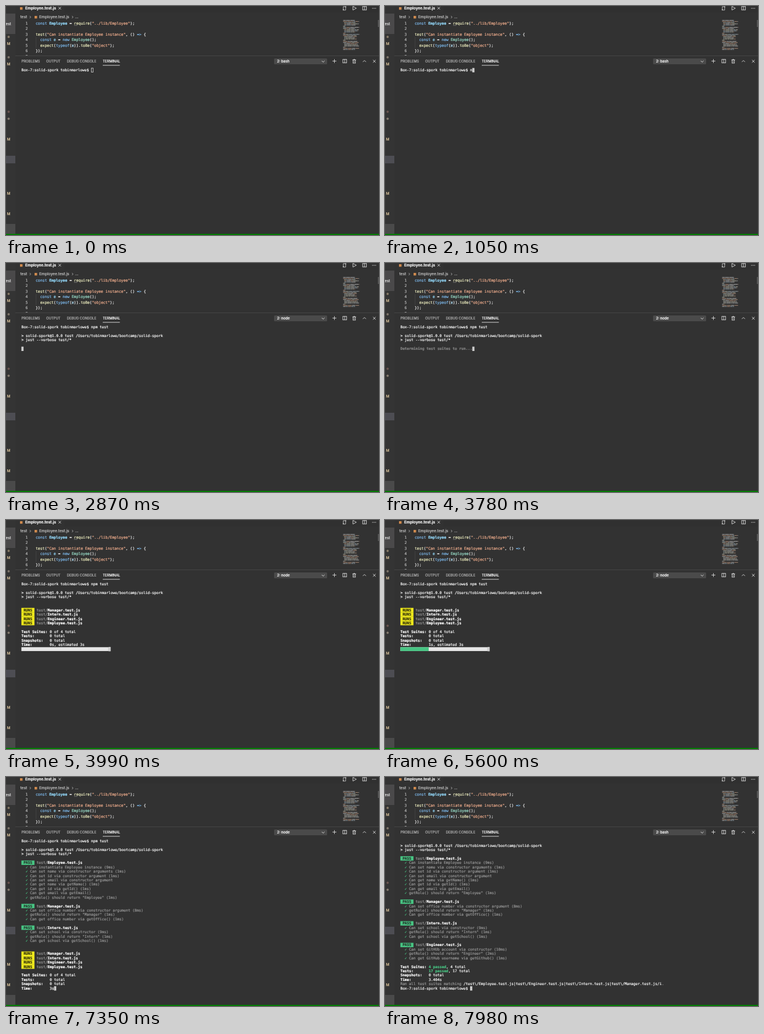
These frames come from a looping animation (640 by 393 pixels, 8000 ms). An HTML page with a canvas:

```html
<!DOCTYPE html>
<html lang="en">
<head>
<meta charset="utf-8">
<title>Test run in the terminal</title>
<style>
html, body { margin: 0; width: 100%; height: 100%; overflow: hidden; background: #323232; }
canvas { display: block; width: 640px; height: 393px; }
</style>
</head>
<body>
<canvas id="stage"></canvas>
<script>
const W = 640, H = 393, LOOP = 8000;
const MONO = '"DejaVu Sans Mono", monospace';
const SANS = 'Inter, sans-serif';
const BG = '#323232', ICON = '#dadada', SCRIPT = '#cf8a4e';
const canvas = document.getElementById('stage');
const ctx = canvas.getContext('2d');
const ratio = window.devicePixelRatio || 1;
canvas.width = W * ratio;
canvas.height = H * ratio;
ctx.scale(ratio, ratio);

// ---- drawing helpers ----
function rect(x, y, w, h, color) {
  ctx.fillStyle = color;
  ctx.fillRect(x, y, w, h);
}
// a thin outline gives small type a fuller weight
function text(str, x, y, font, color, align = 'left') {
  ctx.font = font;
  ctx.fillStyle = ctx.strokeStyle = color;
  ctx.lineWidth = 0.22;
  ctx.textAlign = align;
  ctx.fillText(str, x, y);
  ctx.strokeText(str, x, y);
}
function line(points, color = ICON, width = 0.9) {
  ctx.strokeStyle = color;
  ctx.lineWidth = width;
  ctx.beginPath();
  points.forEach(([x, y], i) => i ? ctx.lineTo(x, y) : ctx.moveTo(x, y));
  ctx.stroke();
}
function box(x, y, w, h, color = ICON, width = 0.9) {
  ctx.strokeStyle = color;
  ctx.lineWidth = width;
  ctx.strokeRect(x, y, w, h);
}
function dot(x, y, r, color) {
  ctx.fillStyle = color;
  ctx.beginPath();
  ctx.arc(x, y, r, 0, 7);
  ctx.fill();
}
function cross(x, y, r, color) {
  line([[x - r, y - r], [x + r, y + r]], color);
  line([[x - r, y + r], [x + r, y - r]], color);
}
function splitIcon(x, y) {
  box(x - 3, y - 3, 6.4, 6);
  line([[x + 0.2, y - 3], [x + 0.2, y + 3]]);
}
function random(seed) {
  return () => (seed = (seed * 16807) % 2147483647) / 2147483647;
}

// ---- sidebar ----
function drawSidebar() {
  rect(0, 0, 16, 391, '#343434');
  rect(0, 13, 16, 35, '#4a494a');
  rect(0, 257, 16, 13, '#4d4d53');
  rect(0, 374, 16, 17, '#4a4a4a');
  text('est', -0.6, 33.2, `6.5px ${SANS}`, '#e4e4e4');
  for (const y of [65, 100, 228.5, 322, 357])
    text('M', 4.5, y + 2.3, `6.3px ${SANS}`, '#e0c8a0', 'center');
  dot(4.5, 53, 2, '#857866');
  dot(4.5, 88, 2, '#7d746a');
  dot(4.5, 181.5, 2, '#69544f');
  dot(4.5, 193.5, 2, '#82796d');
}

// ---- editor ----
const C = {
  key: '#7db9ec', name: '#94d9fb', fn: '#ebebbd', type: '#9adfcb',
  str: '#eeac8c', v: '#b4e2fb', w: '#eeeeee'
};
const CODE = [
  [['key', 'const '], ['name', 'Employee', 'bold'], ['w', ' = '], ['fn', 'require'], ['w', '('], ['str', '"../lib/Employee"'], ['w', ');']],
  [],
  [['fn', 'test'], ['w', '('], ['str', '"Can instantiate Employee instance"'], ['w', ', () '], ['key', '=>'], ['w', ' {']],
  [['key', '  const '], ['name', 'e'], ['w', ' = '], ['key', 'new '], ['type', 'Employee'], ['w', '();']],
  [['fn', '  expect'], ['w', '('], ['key', 'typeof'], ['w', '('], ['v', 'e'], ['w', ')).'], ['fn', 'toBe'], ['w', '('], ['str', '"object"'], ['w', ');']],
  [['w', '});']],
  []
];

function drawMinimap() {
  const rnd = random(41);
  const colors = ['#a6a698', '#a58572', '#8d9aa2', '#a8a8a8'];
  for (let i = 0; i < 26; i++) {
    const y = 24.2 + i * 2;
    const closing = i % 6 === 5;
    const indent = i % 6 < 2 || closing ? 0 : 1.8;
    const end = closing ? 4 : 20 + rnd() * 9;
    for (let x = indent; x < end;) {
      const w = 2 + rnd() * 6;
      rect(578.5 + x, y, Math.min(w, end - x), 1, colors[Math.floor(rnd() * 4)]);
      x += w + 0.5;
    }
  }
}

function drawEditor() {
  rect(100, 0, 540, 11.5, '#303030');
  rect(24, 2, 4.4, 4.4, SCRIPT);
  text('Employee.test.js', 33, 6.3, `600 6.6px ${SANS}`, '#ffffff');
  cross(92.3, 3.8, 2.1, '#e0e0e0');

  const crumb = `6.7px ${SANS}`, grey = '#c2c2c2';
  text('test', 24.5, 21.2, crumb, grey);
  line([[40.6, 17], [42.6, 19], [40.6, 21]], grey, 0.8);
  rect(49, 17, 4.4, 4.4, SCRIPT);
  text('Employee.test.js', 57, 21.2, crumb, grey);
  line([[113.2, 17], [115.2, 19], [113.2, 21]], grey, 0.8);
  text('...', 118.5, 21.2, crumb, grey);

  // toolbar: compare, run, split, more
  line([[582, 1], [578.8, 1], [578.8, 6]], ICON, 0.8);
  line([[579.6, 7], [582.8, 7], [582.8, 2.4]], ICON, 0.8);
  dot(578.8, 6.4, 1, ICON);
  dot(582.8, 1.6, 1, ICON);
  line([[595.2, 0.6], [601.2, 3.8], [595.2, 7], [595.2, 0.6]]);
  splitIcon(615, 3.8);
  for (let i = 0; i < 3; i++) dot(629 + i * 2.6, 4, 0.7, ICON);

  ctx.save();
  ctx.beginPath();
  ctx.rect(16, 22, 624, 63);
  ctx.clip();
  const font = `6.41px ${MONO}`;
  CODE.forEach((parts, i) => {
    const y = 31.6 + i * 9.53;
    let x = 51;
    text(i + 1, 37.3, y, font, '#b4b4b4', 'right');
    for (const [style, str, weight = ''] of parts) {
      text(str, x, y, `${weight} ${font}`, C[style]);
      x += str.length * 3.859;
    }
  });
  rect(51, 53.5, 0.6, 18.8, '#4c4c4c');
  for (let i = 0; i < 3; i++) dot(117.6 + i * 1.9, 33.2, 0.5, '#c4c4c4');
  drawMinimap();
  rect(638, 24, 2, 12, '#555555');
  ctx.restore();
}

// ---- panel header ----
function drawPanelHeader(shell) {
  rect(16, 85, 624, 1, '#454545');
  const font = `5.9px ${SANS}`;
  [['PROBLEMS', 26.5], ['OUTPUT', 69], ['DEBUG CONSOLE', 104.5], ['TERMINAL', 166]].forEach(([label, x], i) =>
    text(label, x, 97.3, font, i === 3 ? '#ffffff' : '#b4b4b4'));
  rect(166, 101.4, 29.3, 0.9, '#e0e0e0');

  ctx.fillStyle = '#4a4a4a';
  ctx.beginPath();
  ctx.roundRect(460, 90, 91, 10, 1.5);
  ctx.fill();
  text('2: ' + shell, 465, 97.2, `500 6.1px ${SANS}`, '#ffffff');
  line([[541.8, 94], [544.2, 96.4], [546.6, 94]], '#e6e6e6');

  line([[560.2, 94.5], [566.8, 94.5]]);
  line([[563.5, 91.2], [563.5, 97.8]]);
  splitIcon(581, 94.6);
  line([[594.4, 92.4], [600.6, 92.4]]);
  box(595.4, 92.7, 4.2, 5.3);
  line([[596.6, 91.4], [598.4, 91.4]]);
  line([[597.5, 94], [597.5, 97]], ICON, 0.7);
  line([[612.3, 96.1], [615, 93.4], [617.7, 96.1]]);
  cross(632, 94.8, 2.3, '#e0e0e0');
}

// ---- terminal ----
const X0 = 26.4, TOP = 106.2, CW = 3.738, ROW = 7.432;
const GREEN = '#48c483', YELLOW = '#efe91c', WHITE = '#f8f8f8';
const STYLE = {
  w: [WHITE], b: ['#ffffff', 'bold'], d: ['#959595'], db: ['#858585', 'bold'],
  g: [GREEN, 'bold'], c: [GREEN],
  pass: ['#26352c', 'bold', GREEN], runs: ['#33320c', 'bold', YELLOW]
};

const PROMPT = 'Box-7:solid-spork tobinmarlowe$ ';
const COMMAND = 'npm test';
const HEADER = [
  [],
  [['w', '> solid-spork@1.0.0 test /Users/tobinmarlowe/bootcamp/solid-spork']],
  [['w', '> jest --verbose test/*']],
  []
];
const SUITES = {
  Employee: [
    'Can instantiate Employee instance (9ms)',
    'Can set name via constructor arguments (1ms)',
    'Can set id via constructor argument (1ms)',
    'Can set email via constructor argument',
    'Can get name via getName() (1ms)',
    'Can get id via getId() (1ms)',
    'Can get email via getEmail()',
    'getRole() should return "Employee" (1ms)'
  ],
  Manager: [
    'Can set office number via constructor argument (8ms)',
    'getRole() should return "Manager" (1ms)',
    'Can get office number via getOffice() (1ms)'
  ],
  Intern: [
    'Can set school via constructor (9ms)',
    'getRole() should return "Intern" (1ms)',
    'Can get school via getSchool() (1ms)'
  ],
  Engineer: [
    'Can set GitHUb account via constructor (10ms)',
    'getRole() should return "Engineer" (2ms)',
    'Can get GitHub username via getGithub() (1ms)'
  ]
};

// times in ms
const FOCUS = 420, ENTER = 2240, NODE = 2450, START = 2730, SEARCH = 3150,
  RUN = 3850, DONE = 7490, BASH = 7840;
const KEYS = [1050, 1120, 1190, 1260, 1330, 1470, 1470, 1540];
const TICKS = [4830, 5880, 6790];
const PASSES = [6930, 7070, 7210, DONE];

const countPast = (times, t) => times.filter(v => t >= v).length;
const badge = (kind, name) =>
  [[kind, ` ${kind.toUpperCase()} `], ['d', ' test/'], ['b', name + '.test.js']];
const suiteRows = name => [
  badge('pass', name),
  ...SUITES[name].map(item => [['c', '  ✓ '], ['d', item]]),
  []
];
const field = (label, ...rest) => [['b', label.padEnd(13)], ...rest];

function progressRows(secs) {
  const rows = [
    [],
    ...['Manager', 'Intern', 'Engineer', 'Employee'].map(n => badge('runs', n)),
    [],
    field('Test Suites:', ['w', '0 of 4 total']),
    field('Tests:', ['w', '0 total']),
    field('Snapshots:', ['w', '0 total']),
    field('Time:', ['w', secs + 's' + (secs < 3 ? ', estimated 3s' : '')])
  ];
  if (secs < 3) rows.push([['bar', Math.floor(secs / 3 * 40)]]);
  return rows;
}

function summaryRows() {
  const files = ['Employee', 'Engineer', 'Intern', 'Manager'].map(n => `test\\/${n}.test.js`);
  return [
    field('Test Suites:', ['g', '4 passed'], ['w', ', 4 total']),
    field('Tests:', ['g', '17 passed'], ['w', ', 17 total']),
    field('Snapshots:', ['w', '0 total']),
    field('Time:', ['w', '3.404s']),
    [['d', 'Ran all test suites matching '], ['w', `/${files.join('|')}/i`], ['d', '.']],
    [['w', PROMPT]]
  ];
}

function terminalRows(t) {
  const rows = [[['w', PROMPT + COMMAND.slice(0, countPast(KEYS, t))]]];
  if (t < ENTER) return rows;
  if (t < START) return [...rows, []];
  rows.push(...HEADER);
  if (t < SEARCH) return [...rows, []];
  if (t < RUN) return [...rows, [['db', 'Determining test suites to run...']]];
  const passed = Object.keys(SUITES).slice(0, countPast(PASSES, t));
  rows.push(...passed.flatMap(suiteRows));
  rows.push(...(t < DONE ? progressRows(countPast(TICKS, t)) : summaryRows()));
  return rows;
}

function drawTerminal(t) {
  const all = terminalRows(t);
  const rows = all.slice(Math.max(0, all.length - 35));
  let col = 0;
  rows.forEach((parts, i) => {
    const y = TOP + i * ROW;
    col = 0;
    for (const [style, value] of parts) {
      const x = X0 + col * CW;
      if (style === 'bar') {
        rect(x, y + 0.6, 40 * CW, ROW - 0.8, '#e6e6e6');
        rect(x, y + 0.6, value * CW, ROW - 0.8, GREEN);
        col += 40;
        continue;
      }
      const [color, weight = '', back] = STYLE[style];
      if (back) rect(x, y, value.length * CW, ROW + 0.1, back);
      text(value, x, y + 5.9, `${weight} 6.21px ${MONO}`, color);
      col += value.length;
    }
  });
  const x = X0 + col * CW, y = TOP + (rows.length - 1) * ROW;
  if (t < FOCUS) box(x + 0.4, y + 0.5, CW - 0.5, ROW - 0.6, '#d8d8d8', 0.8);
  else rect(x, y + 0.2, CW, ROW, '#cecece');
}

function draw(now) {
  const t = now % LOOP;
  rect(0, 0, W, H, BG);
  drawEditor();
  drawSidebar();
  drawPanelHeader(t >= NODE && t < BASH ? 'node' : 'bash');
  drawTerminal(t);
  rect(0, 391, W, 2, '#037a03');
}

const begin = performance.now();
function tick() {
  draw(performance.now() - begin);
  requestAnimationFrame(tick);
}
tick();
</script>
</body>
</html>
```
